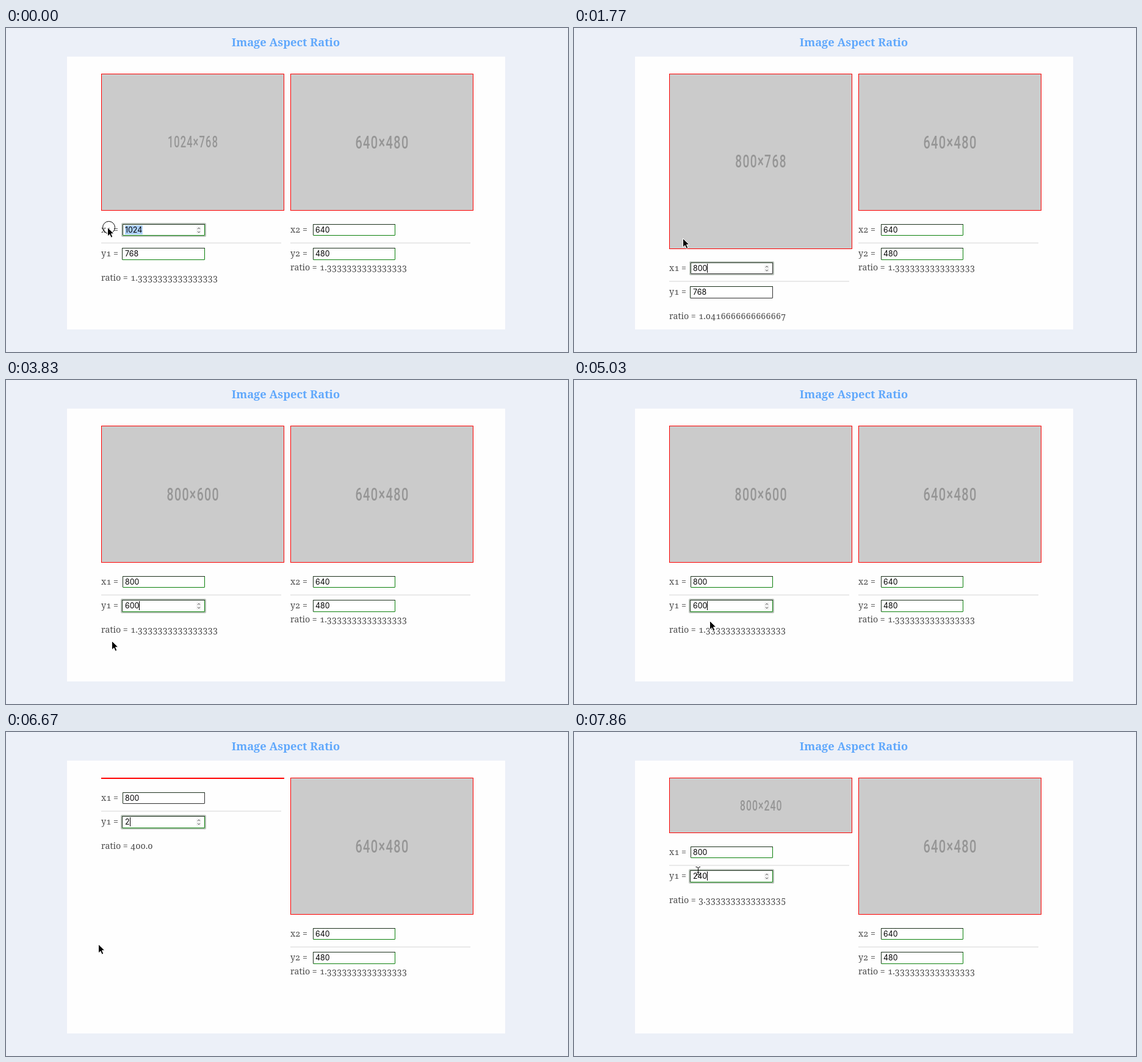
Recreate the animation shown at these times as an HTML page. Size 921 by 532 pixels, loop 8 s.

```html
<!DOCTYPE html>
<html lang="en">
<head>
<meta charset="utf-8">
<title>Image Aspect Ratio</title>
<style>
  html, body { margin: 0; width: 100%; height: 100%; overflow: hidden; background: #ecf0f8; }
  svg { display: block; font: 14.2px "Noto Serif", serif; font-variant-numeric: oldstyle-nums; fill: #4c4c4c; }
  .title { font-size: 18.3px; font-weight: bold; fill: #60a8fc; text-anchor: middle; }
  .field { font: 12.4px Inter, sans-serif; font-variant-numeric: lining-nums; fill: #000; }
  .size { font: 500 30px Roboto, sans-serif; font-variant-numeric: lining-nums; letter-spacing: .063em; fill: #969696; text-anchor: middle; }
  .line { fill: none; stroke-width: 1; }
</style>
</head>
<body>
<svg id="stage" width="921" height="532" viewBox="0 0 921 532"></svg>
<script>
const LOOP = 8000;
const stage = document.getElementById('stage');

// Each entry changes some of the state from its time onwards.
const timeline = [
  [0, { x: '1024', y: '768', image: [1024, 768, 25], focus: 'x', selected: 4, caret: false,
        pointer: 'arrow', at: [166, 327], ring: true }],
  [140, { ring: false }],
  [890, { x: '8', selected: 0, caret: true }],
  [1040, { x: '80' }],
  [1180, { x: '800' }],
  [1480, { image: [800, 768, 29] }],
  [1770, { at: [178, 345] }],
  [1920, { at: [205, 385] }],
  [2065, { at: [222, 425], pointer: 'beam' }],
  [2210, { at: [222, 433], focus: 'y', ring: true }],
  [2360, { at: [205, 433], selected: 2, caret: false }],
  [2505, { at: [176, 429], selected: 3 }],
  [2650, { at: [173, 428], pointer: 'arrow', ring: false }],
  [3390, { y: '6', selected: 0, caret: true }],
  [3540, { y: '60' }],
  [3690, { y: '600' }],
  [3830, { image: [800, 600, 29.7] }],
  [4280, { caret: false }],
  [4580, { at: [176, 445], caret: true }],
  [4730, { at: [185, 453] }],
  [4880, { at: [205, 430] }],
  [5025, { at: [222, 395] }],
  [5175, { at: [222, 371], pointer: 'beam', ring: true }],
  [5325, { at: [205, 368], selected: 2, caret: false }],
  [5470, { at: [175, 356], selected: 3, ring: false }],
  [5620, { at: [153, 350] }],
  [6220, { at: [151, 348], pointer: 'arrow', y: '2', selected: 0, caret: true }],
  [6670, { image: [800, 2, 0] }],
  [6820, { y: '24' }],
  [6960, { y: '240' }],
  [7260, { image: [800, 240, 24] }],
  [7410, { at: [160, 335] }],
  [7560, { at: [175, 290] }],
  [7710, { at: [190, 250] }],
  [7860, { at: [203, 228], pointer: 'beam' }]
];

const stateAt = time =>
  Object.assign({}, ...timeline.filter(([start]) => start <= time).map(([, change]) => change));

const rect = (x, y, w, h, fill, extra = '') =>
  `<rect x="${x}" y="${y}" width="${w}" height="${h}" fill="${fill}" ${extra}/>`;
const text = (x, y, content, kind = '') => `<text x="${x}" y="${y}" class="${kind}">${content}</text>`;
const line = (d, color) => `<path class="line" d="${d}" stroke="${color}"/>`;

const imageHeight = (w, h) => Math.floor(298 * h / w + 2);

function placeholder(x, [w, h, size]) {
  const height = imageHeight(w, h);
  const label = size ? `<g transform="translate(${x + 150.5} ${75 + height / 2 + size * .355}) scale(.66 1)">
    <text class="size" style="font-size:${size}px">${w}×${h}</text></g>` : '';
  return rect(x + .5, 75.5, 299, height - 1, '#cbcbcb', 'stroke="#f00"') + label;
}

function field(x, y, right, height, textX, value, color, active) {
  const width = right - x;
  let out = '';
  if (active) out += rect(x - 2, y - 2, width + 4, height + 4, '#bcc4bc', 'rx="2.5"');
  out += rect(x + .5, y + .5, width - 1, height - 1, '#fff', `stroke="${color}" rx=".5"`) +
    line(`M${x + .5} ${y + height - 1}V${y + .5}H${right}`, '#1c301c');
  if (active && active.selected)
    out += rect(textX, y + 2, active.selected * 7.2, 15, '#acd0fa');
  out += text(textX, y + 14, value, 'field');
  if (active) {
    if (active.caret) out += rect(Math.round(textX + value.length * 7.7), y + 2, 1, 15, '#000');
    out += rect(right - 14, y + 4, 8, 12, '#f1f1f1', 'rx="2"') +
      line(`M${right - 12} ${y + 8}l2-2 2 2m0 4l-2 2-2-2`, '#555');
  }
  return out;
}

function ratio(x, y) {
  const value = x / y;
  return Number.isInteger(value) ? value.toFixed(1) : String(value);
}

function panel({ x, n, lefts, right, textX, ratioY }, w, h, colors, active = {}) {
  const [leftX, leftY] = lefts;
  return text(x, 336, `x${n} =`) +
    field(leftX, 322, right, 19, textX, w, colors[0], active.focus === 'x' && active) +
    rect(x, 352, 295, 2, '#e9e9e9') +
    text(x, 375, `y${n} =`) +
    field(leftY, 361, right, 20, textX, h, colors[1], active.focus === 'y' && active) +
    text(x, ratioY, 'ratio =') + text(x + 48, ratioY, ratio(w, h));
}

const first = { x: 156, n: 1, lefts: [191, 190], right: 326, textX: 195, ratioY: 415 };
const second = { x: 466, n: 2, lefts: [503, 503], right: 638, textX: 507, ratioY: 398 };

const pointers = {
  arrow: '<path d="M.5.5V15L3.9 11.9 6.2 17.2 8.8 16.1 6.5 10.8H11Z" fill="#000" stroke="#fff" stroke-width="1"/>',
  beam: line('M-3.5-6.5Q0-6.5.5-4.5Q1-6.5 4-6.5M.5-4.5V5M-3.5 7Q0 7 .5 5Q1 7 4 7M-1.5 2.5H2.5', '#000')
};

function draw(s) {
  const [w, h] = s.image;
  const shift = imageHeight(w, h) - 225;
  const green = '#0a800a', dark = '#303030';
  const colors = [shift === 63 || shift === -223 ? dark : green, shift === 63 ? dark : green];
  const ring = s.ring ? '<circle class="line" cx="2.5" cy=".5" r="10" stroke="#000"/>' : '';
  return rect(0, 0, 921, 532, '#ecf0f8') + rect(100, 47, 718, 448, '#fefefe') +
    text(458.5, 30, 'Image Aspect Ratio', 'title') +
    placeholder(156, s.image) + placeholder(466, [640, 480, 30.4]) +
    `<g transform="translate(0 ${shift})">${panel(first, s.x, s.y, colors, s)}</g>` +
    panel(second, '640', '480', [green, green]) +
    `<g transform="translate(${s.at})">${ring}${pointers[s.pointer]}</g>`;
}

let shown = '';
function frame() {
  const markup = draw(stateAt(performance.now() % LOOP));
  if (markup !== shown) stage.innerHTML = shown = markup;
  requestAnimationFrame(frame);
}
frame();
</script>
</body>
</html>
```
